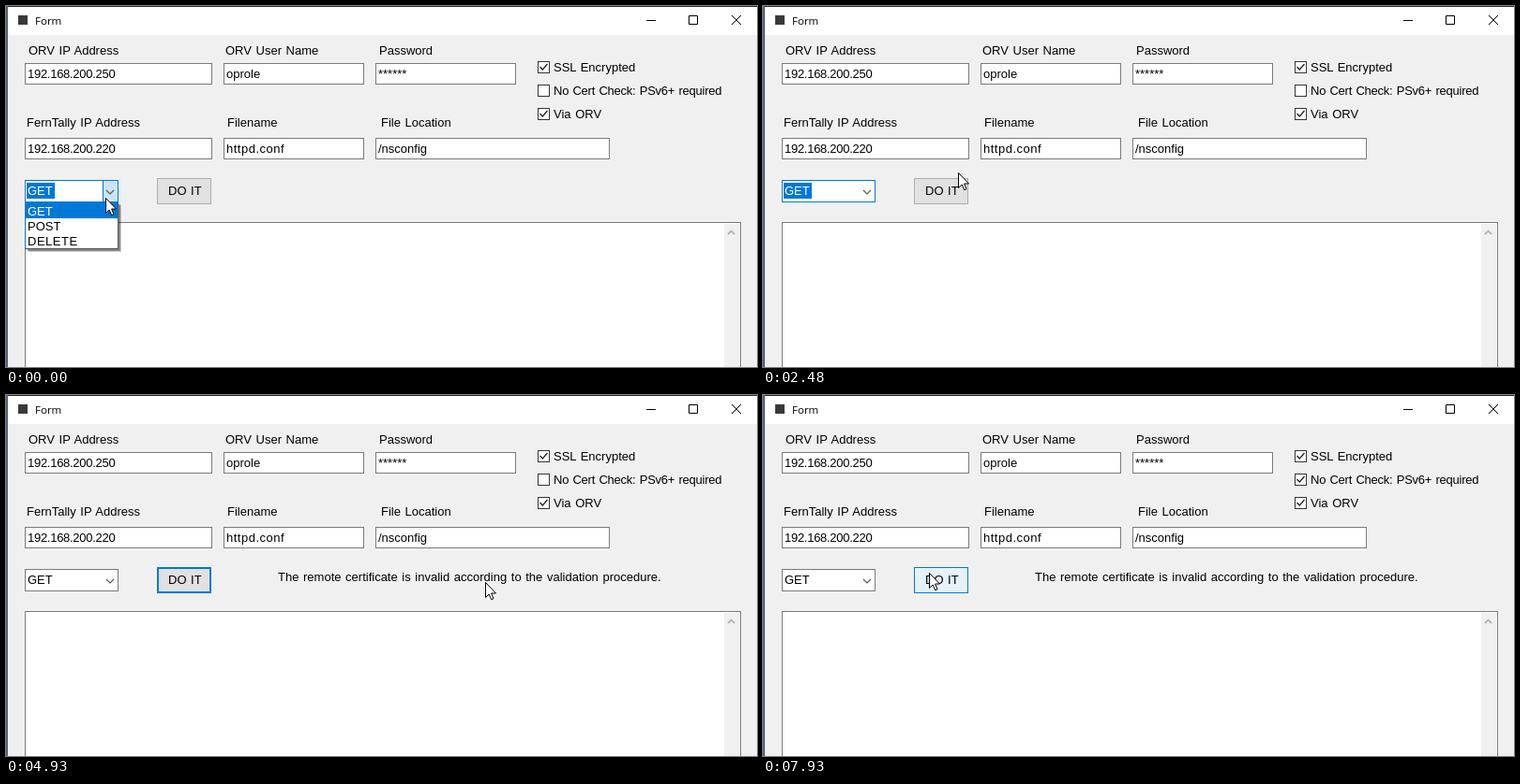
An HTML page for the animation above (8 s loop, 801 px wide and 386 px high).

```html
<!DOCTYPE html>
<html lang="en">
<head>
<meta charset="utf-8">
<title>Form</title>
<style>
html, body { margin: 0; width: 100%; height: 100%; overflow: hidden; background: #f0f0f0; }
svg { display: block; width: 801px; height: 386px; font: 13px "Liberation Sans", Arial, sans-serif; word-spacing: 1px; }
rect { shape-rendering: crispEdges; }
.field { fill: #fff; stroke: #7a7a7a; }
.line { fill: none; stroke: #000; }
.check { fill: none; stroke: #222; stroke-width: 1.3; }
.box { fill: #fff; stroke: #333; }
.box.hover { stroke: #0078d7; }
.ip { letter-spacing: -.28px; }
.wide { letter-spacing: .5px; }
.blue { fill: #0078d7; }
.focus { stroke: #0078d7; }
.on { fill: #fff; }
.dark { stroke: #111; }
.normal { fill: #e1e1e1; stroke: #adadad; }
.hot { fill: #e5f1fb; stroke: #0078d7; }
.pressed { fill: #cce4f7; stroke: #005499; }
.default { fill: #e1e1e1; stroke: #0078d7; }
</style>
</head>
<body>
<svg viewBox="0 0 801 386">
  <defs>
    <path id="mark" class="check" d="M2.500 6l2.800 3 5.200-6"/>
  </defs>
  <rect width="801" height="386" fill="#f0f0f0"/>
  <rect width="801" height="31" fill="#fff"/>
  <rect width="801" height="1" fill="#23262e"/>
  <rect width="2" height="386" fill="#56607a"/>

  <rect x="13" y="10" width="10" height="10" fill="#3a3a3a"/>
  <text x="31" y="20" style="font: 11.5px 'Open Sans', sans-serif">Form</text>
  <path class="line" d="M683 15.5h10M728.5 10.5h9v9h-9z"/>
  <path class="line" d="M774 10l10 10m0-10l-10 10"/>

  <text x="24" y="52">ORV IP Address</text>
  <text x="234" y="52">ORV User Name</text>
  <text x="398" y="52">Password</text>
  <rect class="field" x="20.5" y="61.5" width="199" height="22"/>
  <rect class="field" x="232.5" y="61.5" width="149" height="22"/>
  <rect class="field" x="394.5" y="61.5" width="149" height="22"/>
  <text class="ip" x="23" y="77">192.168.200.250</text>
  <text x="235" y="77">oprole</text>
  <text x="397" y="77">******</text>

  <text x="22" y="129">FernTally IP Address</text>
  <text x="236" y="129">Filename</text>
  <text x="400" y="129">File Location</text>
  <rect class="field" x="20.5" y="141.5" width="199" height="22"/>
  <rect class="field" x="232.5" y="141.5" width="149" height="22"/>
  <rect id="place" class="field" x="394.5" y="141.5" width="249" height="22"/>
  <text class="ip" x="23" y="157">192.168.200.220</text>
  <text class="wide" x="235" y="157">httpd.conf</text>
  <text x="397" y="157">/nsconfig</text>

  <rect class="box" x="567.5" y="59.5" width="12" height="12"/>
  <rect id="cert" class="box" x="567.5" y="84.5" width="12" height="12"/>
  <rect class="box" x="567.5" y="109.5" width="12" height="12"/>
  <use href="#mark" x="567" y="59"/>
  <use href="#mark" x="567" y="84" id="tick"/>
  <use href="#mark" x="567" y="109"/>
  <text x="584" y="70">SSL Encrypted</text>
  <text x="584" y="95" letter-spacing="-.25">No Cert Check: PSv6+ required</text>
  <text x="584" y="120">Via ORV</text>

  <rect id="combo" class="field" x="20.5" y="186.5" width="99" height="23"/>
  <rect id="drop" x="103.5" y="186.5" width="16" height="23" fill="#cce4f7" stroke="#0078d7"/>
  <path d="M107 197l4 4 4-4" fill="none" stroke="#555" stroke-width="1.1"/>
  <rect id="sel" class="blue" x="22" y="189" width="30" height="17"/>
  <text id="value" x="23" y="202">GET</text>

  <rect id="button" x="161.5" y="184.5" width="57" height="27"/>
  <rect id="ring" x="162.5" y="185.5" width="55" height="25" fill="none" stroke="#0078d7"/>
  <text x="173" y="202">DO IT</text>
  <text id="message" x="290" y="199">The remote certificate is invalid according to the validation procedure.</text>

  <rect class="field" x="20.5" y="231.5" width="763" height="200"/>
  <rect x="766" y="233" width="16" height="153" fill="#f0f0f0"/>
  <path d="M770 244l3.5-3.5 3.5 3.5" fill="none" stroke="#b4b4b4" stroke-width="1.8"/>

  <g id="list">
    <rect x="24" y="213" width="99" height="50" opacity=".18"/>
    <rect x="23" y="212" width="99" height="50" opacity=".35"/>
    <rect x="20.5" y="209.5" width="99" height="50" fill="#fff" stroke="#0078d7"/>
    <path d="M21 259.5h98.500v-50" fill="none" stroke="#555"/>
    <rect id="row" class="blue" x="21" width="98" height="17"/>
    <text class="item" x="23" y="224">GET</text>
    <text class="item" x="23" y="240">POST</text>
    <text class="item wide" x="23" y="256">DELETE</text>
  </g>

  <path id="cursor" d="M.5 .5V16.500L4.200 13 6.700 18.700 9 17.700 6.600 12H11.500Z" fill="#fff" stroke="#000" stroke-linejoin="round"/>
</svg>
<script>
const LOOP = 8000, STEP = 142, FADE = 130;
const CLOSE = 1700, CLICK = 3150, REPLY = 3290, CHECK = 6520;

// Pointer stops; each move takes `dur` ms and ends at `end`
const stops = [
  { end: 0, dur: 0, x: 106, y: 205 },
  { end: 540, dur: 540, x: 100, y: 238 },
  { end: 820, dur: 0, x: 97, y: 247 },
  { end: 1400, dur: 0, x: 90, y: 226 },
  { end: 2480, dur: 1080, x: 208, y: 178 },
  { end: 3430, dur: 950, x: 204, y: 200 },
  { end: 4270, dur: 0, x: 226, y: 199 },
  { end: 5200, dur: 930, x: 581, y: 200 },
  { end: 5470, dur: 240, x: 607, y: 201 },
  { end: 5900, dur: 300, x: 683, y: 102 },
  { end: 6680, dur: 780, x: 574, y: 89 },
  { end: 7380, dur: 410, x: 490, y: 188 },
  { end: 7930, dur: 550, x: 177, y: 190 }
];

const $ = id => document.getElementById(id);
const items = document.querySelectorAll(".item");
const show = (id, on) => $(id).style.display = on ? "" : "none";
const smooth = u => u * u * (3 - 2 * u);

// The pointer advances in even time steps along an eased straight line
function pointer(t) {
  const i = stops.findLastIndex(s => s.end <= Math.max(t, 0));
  const from = stops[i], to = stops[i + 1];
  if (!to || t <= to.end - to.dur) return from;
  const n = Math.round(to.dur / STEP);
  const u = smooth(Math.floor((t - to.end + to.dur) / to.dur * n) / n);
  const mix = k => Math.round(from[k] + (to[k] - from[k]) * u);
  return { x: mix("x"), y: mix("y") };
}

function inside(p, x, y, w, h) {
  return p.x > x && p.x < x + w && p.y > y && p.y < y + h;
}

function draw(t) {
  const now = pointer(t), before = pointer(t - FADE);
  const over = (...area) => inside(now, ...area) || inside(before, ...area);
  $("cursor").setAttribute("transform", `translate(${now.x} ${now.y})`);

  const open = t < CLOSE, focus = t < CLICK;
  show("list", open);
  show("drop", open);
  show("sel", focus);
  $("combo").classList.toggle("focus", focus);
  $("value").classList.toggle("on", focus);

  const row = Math.max(0, Math.min(2, Math.floor((now.y - 211) / 16)));
  $("row").setAttribute("y", 210 + 16 * row);
  items.forEach((item, i) => item.classList.toggle("on", i === row));

  const state = t >= CLICK && t < REPLY ? "pressed"
    : !open && over(161, 184, 58, 28) ? "hot"
    : t >= CLICK && t < CHECK ? "default" : "normal";
  $("button").setAttribute("class", state);
  show("ring", state === "default");
  show("message", t >= REPLY);

  $("cert").classList.toggle("hover", over(567, 83, 196, 15));
  show("tick", t >= CHECK);
  $("place").classList.toggle("dark", over(394, 141, 250, 23));
}

// A small lead keeps rounded step times on the right side
function tick() {
  draw(Math.min(performance.now() % LOOP + 10, LOOP - 1));
  requestAnimationFrame(tick);
}
tick();
</script>
</body>
</html>
```
